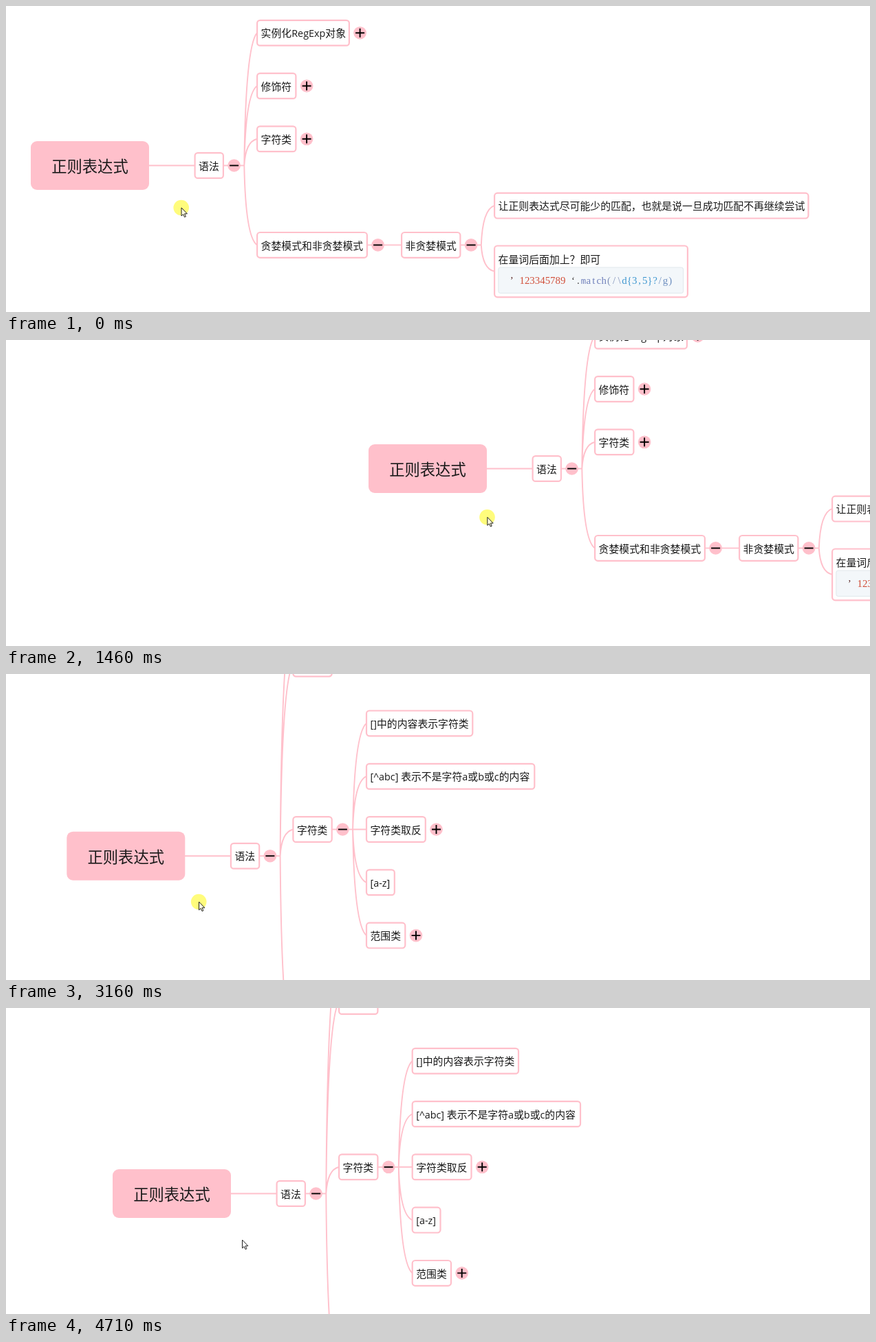
These frames come from a looping animation (1256 px wide and 446 px high, 5.4 s). An HTML page with a canvas:

```html
<!DOCTYPE html>
<html lang="zh-CN">
<head>
<meta charset="utf-8">
<title>正则表达式</title>
<style>
html, body { margin: 0; width: 100%; height: 100%; overflow: hidden; background: #fff; }
canvas { display: block; }
</style>
</head>
<body>
<canvas id="stage" width="1256" height="446"></canvas>
<script>
const ctx = document.getElementById('stage').getContext('2d');
const PINK = '#ffc0cb', INK = '#1a1a1a', LOOP = 5400;
const SIZE = 14.87, MID = 232.5, GAP = 77.3;
const HOME = { x: 36, y: 197 };

// Each drag runs in discrete steps; root and cursor follow the same easing with different leads.
const drags = [
  { begin: 0, at: 760, step: 76, steps: 6, span: 6, rootLead: -.05, cursorLead: .29, bend: 2.13,
    root: [36, 197, 527, 152], cursor: [255, 294, 746, 252] },
  { begin: 1460, at: 1460, step: 74, steps: 6, span: 4, rootLead: -1, cursorLead: -.2, bend: 1,
    root: [527, 152, 83, 230.3], cursor: [746, 252, 302, 312], release: 5, hand: [484, 223] },
  { begin: 3160, at: 3940, step: 76, steps: 4, span: 4, rootLead: .13, cursorLead: .1, bend: 1,
    root: [88.3, 229.7, 597, 226], cursor: [280.5, 332, 788.5, 329], open: true },
  { begin: 4480, at: 4480, step: 76, steps: 4, span: 4, rootLead: 0, cursorLead: .2, bend: 1,
    root: [597, 226, 155, 235], cursor: [788.5, 329, 343.5, 338], open: true, release: 4 }
];

const mix = (a, b, p) => a + (b - a) * p;
const ease = p => { p = Math.min(1, Math.max(0, p)); return p * p * (3 - 2 * p); };

function along([x0, y0, x1, y1], p, bend) {
  return { x: mix(x0, x1, p), y: mix(y0, y1, p ** bend) };
}

function label(str, x, y, size = SIZE) {
  ctx.fillStyle = INK;
  for (const run of str.match(/[ -~]+|[^ -~]+/g)) {
    ctx.font = /[ -~]/.test(run)
      ? `${size * .968}px "Open Sans", sans-serif`
      : `${size}px "Noto Sans CJK SC", "Noto Sans CJK", sans-serif`;
    ctx.fillText(run, x, y);
    x += ctx.measureText(run).width;
  }
}

function roundRect(x, y, w, h, r) {
  ctx.beginPath();
  ctx.roundRect(x, y, w, h, r);
}

function frame(x, y, w, h) {
  roundRect(x + 1.1, y + 1.1, w - 2.2, h - 2.2, 4.2);
  ctx.fillStyle = '#fff';
  ctx.fill();
  ctx.strokeStyle = PINK;
  ctx.lineWidth = 2.2;
  ctx.stroke();
}

function toggle(x, y, sign) {
  ctx.fillStyle = PINK;
  ctx.beginPath();
  ctx.arc(x, y, 9.3, 0, 7);
  ctx.fill();
  ctx.strokeStyle = '#000';
  ctx.lineWidth = 1.9;
  ctx.beginPath();
  ctx.moveTo(x - 6.5, y);
  ctx.lineTo(x + 6.5, y);
  if (sign === '+') {
    ctx.moveTo(x, y - 6.5);
    ctx.lineTo(x, y + 6.5);
  }
  ctx.stroke();
}

function node(str, x, y, w, sign) {
  frame(x, y - 19.5, w, 39);
  label(str, x + 6.6, y + 6.2);
  if (sign) toggle(x + w + 14.6, y, sign);
}

function line(x0, x1, y) {
  ctx.strokeStyle = PINK;
  ctx.lineWidth = 1.9;
  ctx.beginPath();
  ctx.moveTo(x0, y);
  ctx.lineTo(x1, y);
  ctx.stroke();
}

// Stem from a box's right edge, then a curve to every child.
function branch(right, y, childX, childYs) {
  const x = right + 29.3, end = childX + 1;
  line(right - 1, x, y);
  ctx.beginPath();
  for (const cy of childYs) {
    ctx.moveTo(x, y);
    ctx.quadraticCurveTo(mix(x, end, .1), mix(y, cy, .9), end, cy);
  }
  ctx.stroke();
}

function code(x, y) {
  const parts = [
    ['’ ', '#5a2a2a'], ['123345789', '#d14f3a'], [' ‘.', '#333'], ['match', '#7080bb'],
    ['(/\\', '#7f90b8'], ['d{3,5}?', '#3f97d0'], ['/g)', '#6f90c0']
  ];
  ctx.textAlign = 'center';
  let col = 0;
  for (const [str, color] of parts) {
    ctx.fillStyle = color;
    for (const ch of str) {
      ctx.font = ch === 'm' ? '12.4px "Liberation Mono", monospace'
                            : `${SIZE}px "Liberation Serif", serif`;
      ctx.fillText(ch, x + (col++ + .5) * SIZE / 2, y);
    }
  }
  ctx.textAlign = 'left';
}

function lazyBranch(y) {
  branch(661.5, y, 709, [y - 57.5, y + 38.5]);
  line(525, 575, y);
  node('非贪婪模式', 574, y, 87.5, '-');
  node('让正则表达式尽可能少的匹配，也就是说一旦成功匹配不再继续尝试', 709, y - 57.3, 458.5);
  frame(709, y, 283, 77);
  label('在量词后面加上？即可', 715.6, y + 26.4);
  roundRect(715.8, y + 32.6, 268.8, 37.6, 3);
  ctx.fillStyle = '#f3f7fa';
  ctx.fill();
  ctx.strokeStyle = '#e1e7ec';
  ctx.lineWidth = 1;
  ctx.stroke();
  code(731.6, y + 56.2);
}

function classBranch(y) {
  const x = 470.6;
  const items = [
    ['[]中的内容表示字符类', 156.5], ['[^abc] 表示不是字符a或b或c的内容', 246.5],
    ['字符类取反', 88, '+'], ['[a-z]', 43], ['范围类', 58.5, '+']
  ];
  const ys = items.map((_, i) => y + (i - 2) * GAP);
  branch(422.5, y, x, ys);
  items.forEach(([str, w, sign], i) => node(str, x, ys[i], w, sign));
}

function map(open) {
  const shift = open ? 164 : 0;
  const classY = MID - 38.7;
  const flagY = classY - GAP - shift, newY = flagY - GAP;
  const greedyY = classY + 2 * GAP + shift;

  line(207, 275, MID);
  branch(317, MID, 364, [newY, flagY, classY, greedyY]);
  open ? classBranch(classY) : lazyBranch(greedyY);

  roundRect(36, 197, 172, 71, 9);
  ctx.fillStyle = PINK;
  ctx.fill();
  label('正则表达式', 66.2, 242, SIZE * 1.5);

  node('语法', 273.5, MID, 43.5, '-');
  node('实例化RegExp对象', 364, newY, 136, '+');
  node('修饰符', 364, flagY, 58.5, '+');
  node('字符类', 364, classY, 58.5, open ? '-' : '+');
  node('贪婪模式和非贪婪模式', 364, greedyY, 162, '-');
}

const ARROW = new Path2D('M0 0V12L2.7 9.6L4.5 13.7L6.4 12.9L4.6 8.8H8.4Z');
const HAND = new Path2D('M2.5 10V1.8Q3.8 .2 5 1.8V6L10 7Q11.4 7.6 11 10L10 14V17H4.5V15L.5 10.5Q.3 8.8 2.5 10Z');

function pointer(x, y, shape, halo) {
  if (halo) {
    ctx.fillStyle = '#fffc7c';
    ctx.beginPath();
    ctx.arc(x - .3, y, 11.3, 0, 7);
    ctx.fill();
  }
  ctx.save();
  ctx.translate(x, y);
  ctx.fillStyle = halo ? '#fffde0' : '#fff';
  ctx.fill(shape);
  ctx.strokeStyle = '#222';
  ctx.lineWidth = 1;
  ctx.stroke(shape);
  ctx.restore();
}

function draw(t) {
  const d = drags.findLast(d => t >= d.begin);
  const n = Math.max(0, Math.min(d.steps, Math.floor((t - d.at) / d.step) + 1));
  const progress = lead => n ? ease((n + lead) / d.span) : 0;
  const root = along(d.root, progress(d.rootLead), d.bend);
  const cursor = along(d.cursor, progress(d.cursorLead), d.bend);

  ctx.fillStyle = '#fff';
  ctx.fillRect(0, 0, 1256, 446);
  ctx.save();
  ctx.translate(root.x - HOME.x, root.y - HOME.y);
  map(d.open);
  ctx.restore();

  const free = n >= d.release;
  if (d.hand && free) {
    const p = n === d.steps ? 1 : .5;
    pointer(mix(cursor.x, d.hand[0], p), mix(cursor.y, d.hand[1], p), p === 1 ? HAND : ARROW, false);
  } else {
    pointer(cursor.x, cursor.y, ARROW, !free);
  }
}

function tick() {
  draw(performance.now() % LOOP);
  requestAnimationFrame(tick);
}
tick();
</script>
</body>
</html>
```
